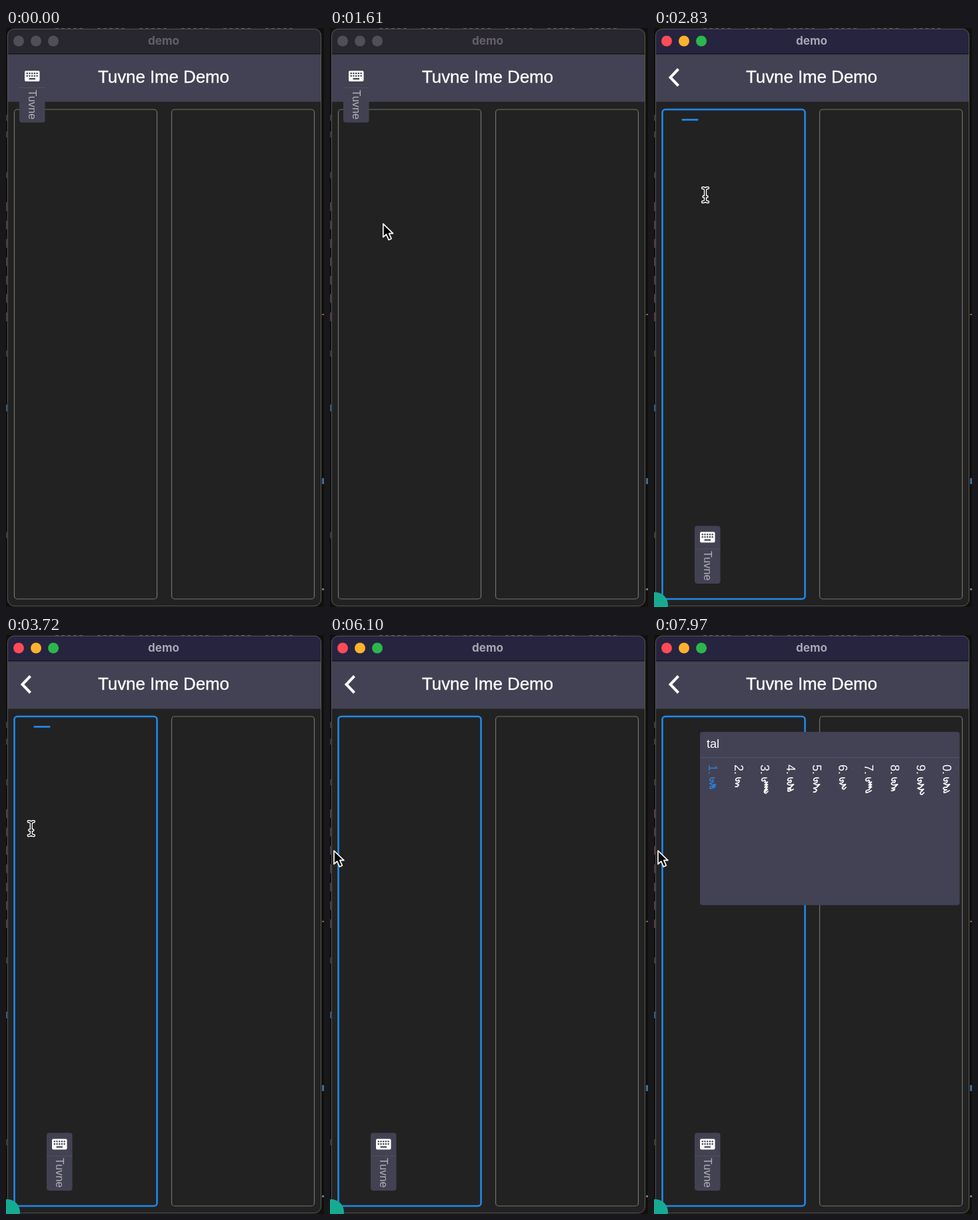
An HTML page for the animation above (8 s loop, 477x867 px).

```html
<!DOCTYPE html>
<html lang="en">
<head>
<meta charset="utf-8">
<title>demo</title>
<style>
html, body { margin: 0; width: 100%; height: 100%; overflow: hidden; background: #11110b; }
svg { display: block; width: 100vw; height: 100vh; }
text { font-family: "Liberation Sans", Arial, sans-serif; }
.bar { font: 700 17px Inter, sans-serif; }
.words path { fill: none; stroke: currentColor; stroke-width: 1.7; stroke-linejoin: round; stroke-linecap: round; }
.words text { fill: currentColor; font-size: 18px; }
</style>
</head>
<body>
<svg viewBox="0 0 477 867" preserveAspectRatio="none">
  <defs>
    <clipPath id="win"><rect x="2" y="1" width="471" height="865" rx="10"/></clipPath>
  </defs>
  <rect width="477" height="867" fill="#11110b"/>
  <g id="fringe"></g>

  <g clip-path="url(#win)">
    <rect x="2" y="1" width="471" height="865" fill="#222223"/>
    <rect id="titlebar" x="2" y="1" width="471" height="37"/>
    <rect x="2" y="38" width="471" height="1.5" fill="#15151a"/>
    <rect x="2" y="39.5" width="471" height="71" fill="#434254"/>
  </g>
  <rect x="2.5" y="1.5" width="470" height="864" rx="10" fill="none" stroke="#56565c"/>
  <g id="lights"></g>
  <text id="caption" class="bar" x="236.5" y="25" text-anchor="middle">demo</text>
  <path d="M36.5 61.5 24.5 74l12 12.5" fill="none" stroke="#fff" stroke-width="4"/>
  <text x="236.5" y="82" font-size="25.8" fill="#fff" stroke="#fff" stroke-width=".35" text-anchor="middle">Tuvne Ime Demo</text>

  <rect id="left" x="12.5" y="122" width="214" height="733" rx="4.5" fill="none"/>
  <rect x="248.5" y="122" width="214" height="733" rx="4.5" fill="none" stroke="#74746a" stroke-width="1.2"/>
  <rect id="caret" x="41.5" y="136" width="25" height="2.8" rx="1" fill="#2188e8"/>

  <g id="ime">
    <rect width="38.5" height="86.5" rx="4" fill="#434252"/>
    <path d="M0 34.5H38.5" stroke="#52515f"/>
    <rect x="8" y="9" width="22.5" height="16" rx="2" fill="#fff"/>
    <g id="keys" fill="#434252"></g>
    <text transform="translate(13.5 37.5) rotate(90)" font-size="16.2" fill="#b2b1ba">Tuvne</text>
  </g>

  <g id="panel">
    <rect x="69" y="145" width="389.5" height="259.5" rx="4" fill="#434254"/>
    <path d="M69 183.5H458.5" stroke="#545366"/>
    <text id="typed" x="79" y="169" font-size="18" fill="#fff"></text>
    <g id="words" class="words"></g>
  </g>

  <circle id="badge" cx="2" cy="864" r="19" fill="#17aa92"/>

  <path id="arrow" d="M0 0V20l4.7-4.2 3.6 8.2 4-1.8-3.5-7.8h6z" fill="#000" stroke="#fff" stroke-width="1.7" stroke-linejoin="round"/>
  <g id="beam" fill="none" stroke-linecap="round">
    <path d="M-4-10.5Q0-10.5 0-7Q0-10.5 4-10.5M0-7V7M-4 10.5Q0 10.5 0 7Q0 10.5 4 10.5M-2.5 2.5h5" stroke="#fff" stroke-width="4.4"/>
    <path d="M-4-10.5Q0-10.5 0-7Q0-10.5 4-10.5M0-7V7M-4 10.5Q0 10.5 0 7Q0 10.5 4 10.5M-2.5 2.5h5" stroke="#111" stroke-width="1.6"/>
  </g>
</svg>
<script>
const LOOP = 8000, FOCUS = 2160, BORDER = 2270, BLINK = 2340;
const $ = id => document.getElementById(id);
const show = (id, on) => $(id).setAttribute('display', on ? 'inline' : 'none');
const set = (id, attrs) => { for (const k in attrs) $(id).setAttribute(k, attrs[k]); };
const place = (id, x, y) => set(id, { transform: `translate(${x} ${y})` });

// Slivers of the desktop behind the window
const sliver = (x, y, w, h, fill) => `<rect x="${x}" y="${y}" width="${w}" height="${h}" fill="${fill}"/>`;
let bits = '';
for (let i = 0; i < 44; i++) {
  if (i % 7 > 1) bits += sliver(56 + i * 9, 0, 5, 1, i % 11 ? '#4c4c42' : '#7a4a3c');
}
for (let i = 0; i < 7; i++) bits += sliver(0, 261 + i * 27.5, 1.5, 13, '#63454a');
for (const y of [130, 155, 216, 483, 755]) bits += sliver(0, y, 1.5, 9, '#3f4a35');
bits += sliver(0, 564, 1.5, 10, '#3b6f96') + sliver(474, 428, 3, 2, '#8a6038')
  + sliver(474, 674, 3, 9, '#3b6f96') + sliver(474, 839, 3, 3, '#77776c');
$('fringe').innerHTML = bits;

$('lights').innerHTML = [19, 45, 71].map(x => `<circle cx="${x}" cy="19.5" r="8"/>`).join('');

let keys = '';
for (let r = 0; r < 2; r++)
  for (let c = 0; c < 5; c++) keys += sliver(10.6 + c * 3.7, 11.8 + r * 3.8, 2.3, 2.2);
$('keys').innerHTML = keys.replaceAll('fill="undefined"', '') + '<rect x="14.5" y="20" width="9.5" height="2.2"/>';

// One vertical cursive word: looped head, toothed stem, swept tail
function cursive(x, len, seed) {
  const top = 213, end = top + len, stem = x + 6;
  let d = `M${stem + 3} ${top + 1}q-7-1-7.5 3q2 3.500 4.500 0q2 1 0 4`;
  let y = top + 8;
  for (let i = 0; y < end - 5; i++, y += 3.6) {
    const kind = (seed * 7 + i * 5 + seed * i) % 4;
    if (kind === 0) d += `q-5-1-5 2q2 2 5 1.600`;
    else if (kind === 1) d += `l4.500-1l-4.500 4.600`;
    else d += `l-4.500 1.200l4.500 2.400`;
  }
  d += seed % 3 === 0 ? `L${stem} ${end - 4}q-5 0-4 4q3 0 8-3`
     : seed % 3 === 1 ? `L${stem} ${end - 4}q-1 4-5 3`
     : `L${stem} ${end - 4}q-2 3 2 4l3-3`;
  return `<path d="${d}"/>`;
}

const stages = [
  { at: 6300, text: 't', lens: [9, 16, 16, 28, 27, 18, 9, 33, 16, 54] },
  { at: 7000, text: 'ta', lens: [12, 16, 20, 19, 24, 18, 22, 26, 21, 30] },
  { at: 7400, text: 'tal', lens: [17, 15, 24, 21, 23, 18, 23, 21, 26, 23] }
];

function candidates(stage) {
  return stage.lens.map((len, i) => {
    const x = 82 + i * 39;
    return `<g color="${i ? '#fff' : '#2a7fd6'}">
      <text transform="translate(${x} 194) rotate(90)">${(i + 1) % 10}.</text>
      ${cursive(x, len, i + stage.text.length * 3)}</g>`;
  }).join('');
}

const track = [
  [820, -16, 345], [1120, 80, 298], [1500, 80, 298], [2000, 78, 252],
  [2400, 78, 252], [2700, 77, 250], [3400, 77, 250], [4000, 6, 322]
];

function pointer(t) {
  const next = track.findIndex(p => p[0] > t);
  if (next === 0) return [-60, 345];
  if (next < 0) return track[track.length - 1].slice(1);
  const [t0, x0, y0] = track[next - 1], [t1, x1, y1] = track[next];
  const u = (t - t0) / (t1 - t0), e = u * u * (3 - 2 * u);
  return [x0 + (x1 - x0) * e, y0 + (y1 - y0) * e];
}

let current = null;
function render(t) {
  const active = t >= FOCUS, blue = t >= BORDER;
  set('titlebar', { fill: active ? '#26243f' : '#28272f' });
  set('caption', { fill: active ? '#a8a6b2' : '#655f69' });
  const colours = active ? ['#fe4b57', '#fdb32b', '#2cb74c'] : Array(3).fill('#504e58');
  [...$('lights').children].forEach((c, i) => c.setAttribute('fill', colours[i]));
  set('left', { stroke: blue ? '#2188e8' : '#74746a', 'stroke-width': blue ? 2.6 : 1.2 });
  show('caret', active && (t < BLINK || (t - BLINK) % 1000 < 500));
  show('badge', active);
  if (active) place('ime', 61, 745.5); else place('ime', 20, 55);

  const stage = stages.filter(s => t >= s.at).pop();
  show('panel', stage);
  if (stage && stage !== current) {
    $('typed').textContent = stage.text;
    $('words').innerHTML = candidates(stage);
  }
  current = stage;

  const [x, y] = pointer(t), text = active && x > 12;
  show('beam', text);
  show('arrow', !text);
  place(text ? 'beam' : 'arrow', x, y + (text ? 0 : 1));
}

const start = performance.now();
function tick() {
  render((performance.now() - start) % LOOP);
  requestAnimationFrame(tick);
}
tick();
</script>
</body>
</html>
```
